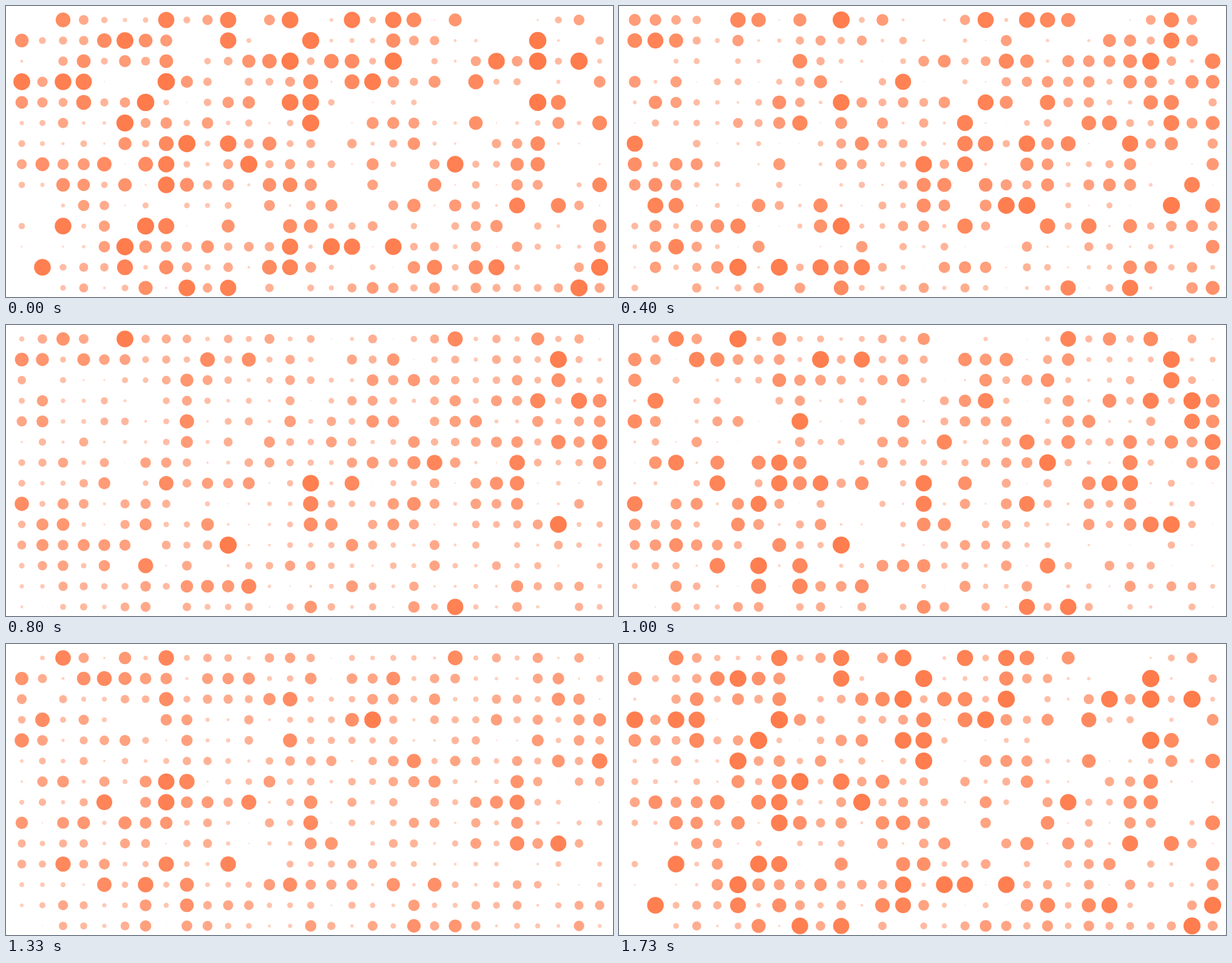
These frames come from a looping animation (1000x480 px, 1.79 s). An HTML page with a canvas:

```html
<!DOCTYPE html>
<html lang="en">
<head>
<meta charset="utf-8">
<title>Dot grid</title>
<style>
  html, body { margin: 0; width: 100%; height: 100%; overflow: hidden; background: #fff; }
  canvas { display: block; }
</style>
</head>
<body>
<canvas id="stage" width="1000" height="480"></canvas>
<script>
const ctx = document.getElementById('stage').getContext('2d');
const COLS = 29, ROWS = 14, STEP = 34, ORIGIN_X = 26, ORIGIN_Y = 23;
const LOOP = 1790, MAX_RADIUS = 14.4;

// Columns of the largest dots, row by row, for each resting pose
const peaks = [
  [[7, 10, 13, 16, 18], [5, 10, 14, 25], [13, 18, 23, 25, 27], [0, 2, 3, 7, 17],
   [6, 13, 14, 25], [5, 14], [8, 10], [7, 11, 21], [7], [24], [2, 6, 7],
   [5, 13, 15, 16, 18], [1, 5, 13, 23, 28], [8, 10, 27]],
  [[5, 10, 17, 19, 20, 26], [1, 26], [8, 25, 28], [13], [10, 17, 20],
   [8, 16, 23, 26], [0, 16, 17, 19, 21, 24], [14, 16], [27], [1, 2, 18, 19, 26, 28],
   [5, 10, 16, 20, 22], [2], [5, 7, 9, 11], [21, 24]],
  [[2, 5, 21], [3, 9, 11, 26], [26], [1, 17, 25, 27], [8, 27], [15, 19, 28],
   [2, 7, 20], [4, 7, 9, 14, 23, 24], [0, 6, 14, 19], [25, 26], [10],
   [4, 6, 8, 20], [6, 8], [19, 21]]
];

function seededRandom(seed) {
  return () => {
    seed = (seed + 0x6D2B79F5) | 0;
    let n = Math.imul(seed ^ (seed >>> 15), 1 | seed);
    n = (n + Math.imul(n ^ (n >>> 7), 61 | n)) ^ n;
    return ((n ^ (n >>> 14)) >>> 0) / 2 ** 32;
  };
}

const random = seededRandom(7);
const poses = peaks.map(rows => rows.flatMap(large =>
  Array.from({ length: COLS }, (_, col) => {
    const u = random();
    return large.includes(col) ? 13 + u * 1.4 : Math.max(0, u * 15 - 2.5);
  })));

// cubic-bezier(.25, .1, .25, 1)
function ease(x) {
  const bezier = (s, a, b) => 3 * a * s * (1 - s) ** 2 + 3 * b * s * s * (1 - s) + s ** 3;
  let low = 0, high = 1;
  for (let i = 0; i < 20; i++) {
    const mid = (low + high) / 2;
    if (bezier(mid, 0.25, 0.25) < x) low = mid; else high = mid;
  }
  return bezier(low, 0.1, 1);
}

function draw() {
  const phase = performance.now() % LOOP / LOOP * poses.length;
  const index = Math.floor(phase);
  const progress = ease(phase - index);
  const from = poses[index], to = poses[(index + 1) % poses.length];

  ctx.globalAlpha = 1;
  ctx.fillStyle = '#fff';
  ctx.fillRect(0, 0, 1000, 480);
  ctx.fillStyle = '#ff7a4a';
  for (let i = 0; i < COLS * ROWS; i++) {
    const radius = from[i] + (to[i] - from[i]) * progress;
    if (radius < 0.3) continue;
    ctx.globalAlpha = Math.min(1, 0.2 + 0.8 * radius / MAX_RADIUS);
    ctx.beginPath();
    ctx.arc(ORIGIN_X + i % COLS * STEP, ORIGIN_Y + Math.floor(i / COLS) * STEP, radius, 0, 2 * Math.PI);
    ctx.fill();
  }
  requestAnimationFrame(draw);
}
draw();
</script>
</body>
</html>
```
